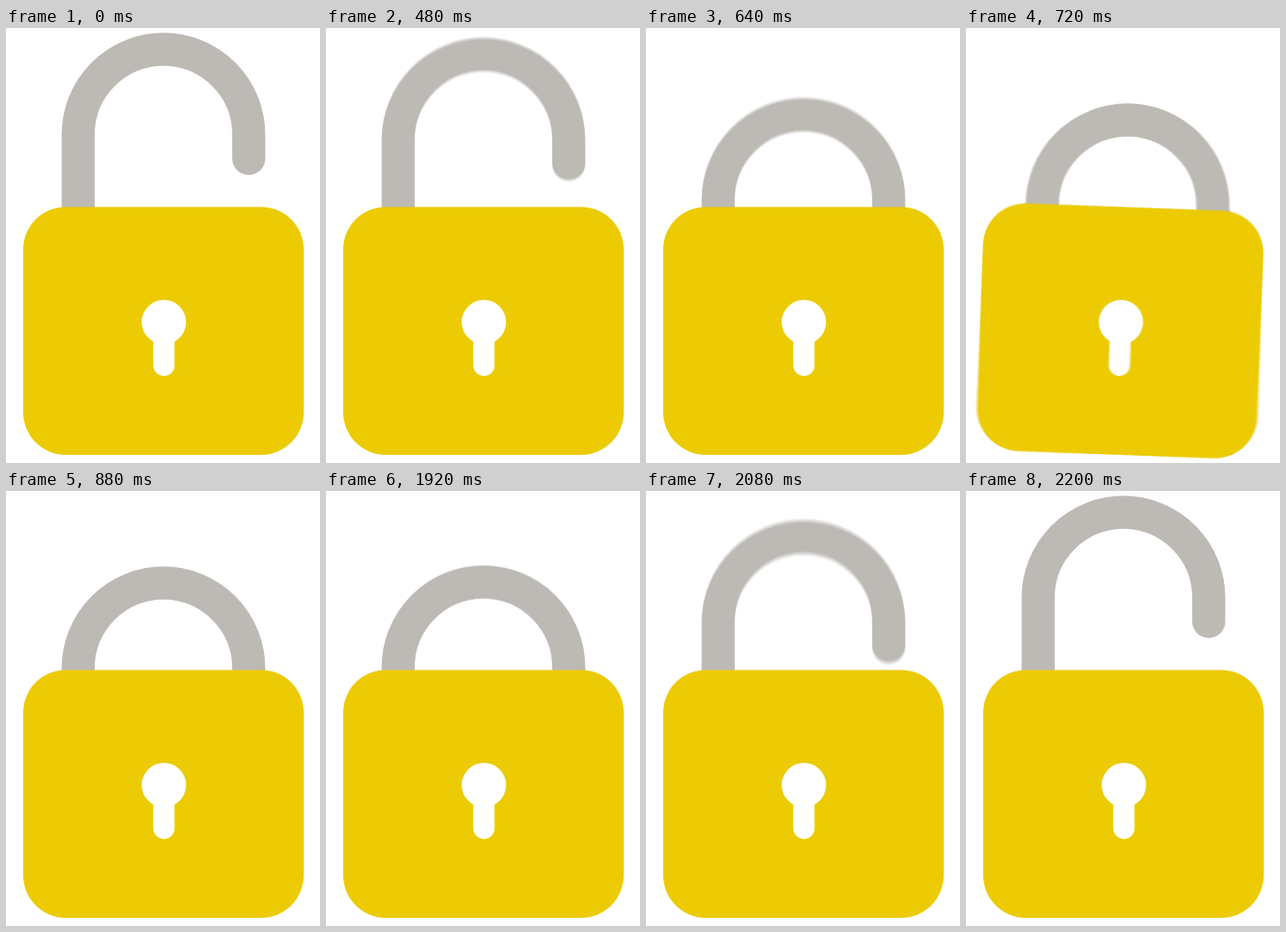
Write an HTML page with a canvas that moves like this. It is 347 px wide and 480 px high and loops after 2880 ms.

```html
<!DOCTYPE html>
<html lang="en">
<head>
<meta charset="utf-8">
<title>Padlock</title>
<style>
  html, body { margin: 0; width: 100%; height: 100%; overflow: hidden; background: #fff; }
  canvas { display: block; }
</style>
</head>
<body>
<canvas id="stage" width="347" height="480"></canvas>
<script>
const LOOP = 2880, STEP = 40, SHUTTER = 16, SAMPLES = 8;
const WHITE = '#fff', YELLOW = '#eccb04', GRAY = '#bdbab5';
const DROP = 78;
const PIVOT = { x: 174, y: 236 };

// Keyframes as [time, value], eased between neighbours
const dropKeys = [[440, 0], [680, DROP], [1900, DROP], [2200, 0]];
const tiltKeys = [[680, 0], [772, 5.2], [840, -1.8], [880, 0]];

const stage = document.getElementById('stage');
const screen2d = stage.getContext('2d');
const buffer = document.createElement('canvas');
buffer.width = stage.width;
buffer.height = stage.height;
const ctx = buffer.getContext('2d');

const smooth = p => p * p * (3 - 2 * p);

function valueAt(keys, t) {
  if (t <= keys[0][0]) return keys[0][1];
  for (let i = 1; i < keys.length; i++) {
    const [t0, a] = keys[i - 1], [t1, b] = keys[i];
    if (t < t1) return a + (b - a) * smooth((t - t0) / (t1 - t0));
  }
  return keys[keys.length - 1][1];
}

function drawShackle(dx, dy) {
  ctx.save();
  ctx.translate(dx, dy);
  ctx.strokeStyle = GRAY;
  ctx.lineWidth = 36.5;
  ctx.lineCap = 'round';
  ctx.beginPath();
  ctx.moveTo(79.75, 225);
  ctx.arc(174, 117.75, 94.25, Math.PI, 0);
  ctx.lineTo(268.25, 144);
  ctx.stroke();
  ctx.restore();
}

function drawBody(degrees) {
  ctx.save();
  ctx.translate(PIVOT.x, PIVOT.y);
  ctx.rotate(degrees * Math.PI / 180);
  ctx.translate(-PIVOT.x, -PIVOT.y);
  ctx.fillStyle = YELLOW;
  ctx.beginPath();
  ctx.roundRect(19, 197.5, 310, 273.5, 47);
  ctx.fill();

  ctx.fillStyle = ctx.strokeStyle = WHITE;
  ctx.beginPath();
  ctx.arc(174.5, 324.5, 24.5, 0, Math.PI * 2);
  ctx.fill();
  ctx.lineWidth = 23.5;
  ctx.lineCap = 'round';
  ctx.beginPath();
  ctx.moveTo(174.5, 324.5);
  ctx.lineTo(174.5, 372.25);
  ctx.stroke();
  ctx.restore();
}

function drawScene(t) {
  const tilt = valueAt(tiltKeys, t);
  ctx.fillStyle = WHITE;
  ctx.fillRect(0, 0, buffer.width, buffer.height);
  drawShackle(tilt * 2.15, valueAt(dropKeys, t));
  drawBody(tilt);
}

// Averages several moments within the shutter time while something moves
function render(t) {
  const moving = (t >= 480 && t < 880) || (t >= 1920 && t < 2200);
  const count = moving ? SAMPLES : 1;
  for (let i = 0; i < count; i++) {
    drawScene(t + ((i + 0.5) / count - 0.5) * SHUTTER);
    screen2d.globalAlpha = 1 / (i + 1);
    screen2d.drawImage(buffer, 0, 0);
  }
}

const start = performance.now();
function tick() {
  const t = (performance.now() - start) % LOOP;
  render(Math.floor(t / STEP) * STEP);
  requestAnimationFrame(tick);
}
tick();
</script>
</body>
</html>
```
